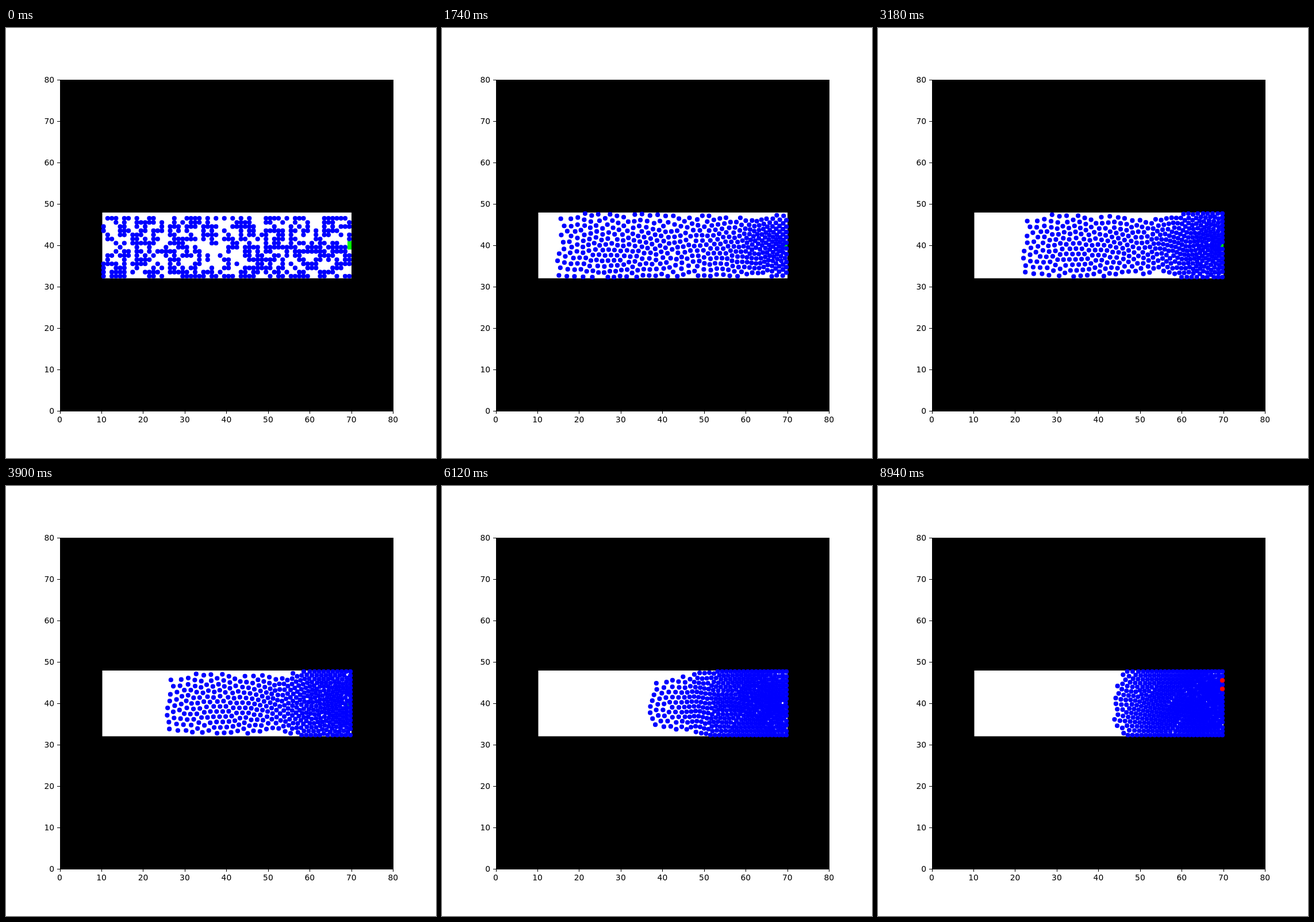
An HTML page with a canvas that plays this animation: 748x748 px, repeating every 9 s.

```html
<!DOCTYPE html>
<html lang="en">
<head>
<meta charset="utf-8">
<title>Crowd leaving a corridor</title>
<style>
  html, body { margin: 0; width: 100%; height: 100%; overflow: hidden; background: #fff; }
  svg, canvas { position: absolute; left: 0; top: 0; }
  text { font: 13.89px "DejaVu Sans", sans-serif; }
</style>
</head>
<body>
<svg id="plot" width="748" height="748">
  <rect x="94" y="90" width="580" height="577"/>
  <rect x="167.5" y="321" width="433.5" height="114.4" fill="#fff"/>
  <rect x="594" y="370.4" width="7" height="15" fill="#0f0"/>
</svg>
<canvas id="crowd" width="748" height="748"></canvas>
<script>
const FRAMES = 150, FRAME_MS = 60, SUBSTEPS = 6, DT = 1 / SUBSTEPS;
const SPEED = 0.33, RELAX = 12;              // walking speed and reaction time, per frame
const EXIT = { x: 70, y: 40 };
const AREA = { left: 10.5, right: 69.75, bottom: 32.3, top: 47.65 };
const DOT_RADIUS = 4.1, RED_FROM = 132, EXIT_INTERVAL = 10;

const px = x => 93.5 + 7.248 * x;
const py = y => 665.8 - 7.199 * y;

function addAxes() {
  let marks = '';
  for (let v = 0; v <= 80; v += 10) {
    const x = Math.round(px(v)) + 0.5, y = Math.round(py(v)) + 0.5;
    marks += `<path d="M${x} 666v5M94 ${y}h-5" stroke="#000" stroke-width="1.1"/>
      <text x="${px(v)}" y="686" text-anchor="middle">${v}</text>
      <text x="84.2" y="${y + 4.5}" text-anchor="end">${v}</text>`;
  }
  document.getElementById('plot').insertAdjacentHTML('beforeend', marks);
}

let seed = 20;
function random() {
  seed = (seed * 1664525 + 1013904223) % 4294967296;
  return seed / 4294967296;
}

// One person per randomly chosen grid cell; the exit cells stay free.
function createPeople() {
  const people = [];
  for (let x = 10.5; x < 70; x++)
    for (let y = 32.5; y < 47; y++) {
      const atExit = x > 69 && Math.abs(y - EXIT.y) < 1;
      if (random() < 0.52 && !atExit) people.push({ id: people.length, x, y, vx: 0, vy: 0, ax: 0, ay: 0 });
    }
  return people;
}

function headForExit(p) {
  const dx = EXIT.x - p.x, dy = EXIT.y - p.y, d = Math.hypot(dx, dy) || 1;
  p.ax = (SPEED * dx / d - p.vx) / RELAX;
  p.ay = (SPEED * dy / d - p.vy) / RELAX;
}

// Exponential repulsion plus damping along the line between two people.
function pushApart(a, b) {
  const dx = a.x - b.x, dy = a.y - b.y, d2 = dx * dx + dy * dy;
  if (d2 > 4) return;
  const d = Math.max(Math.sqrt(d2), 0.4), nx = dx / d, ny = dy / d;
  let force = 0.012 * Math.exp((1.36 - d) / 0.13);
  if (d < 1.5) force -= 0.15 * ((a.vx - b.vx) * nx + (a.vy - b.vy) * ny);
  a.ax += force * nx; a.ay += force * ny;
  b.ax -= force * nx; b.ay -= force * ny;
}

function move(p) {
  p.vx += p.ax * DT; p.vy += p.ay * DT;
  p.x += p.vx * DT; p.y += p.vy * DT;
  const x = Math.min(AREA.right, Math.max(AREA.left, p.x));
  const y = Math.min(AREA.top, Math.max(AREA.bottom, p.y));
  if (x !== p.x) { p.x = x; p.vx = 0; }
  if (y !== p.y) { p.y = y; p.vy = 0; }
}

function step(people) {
  people.forEach(headForExit);
  for (let i = 1; i < people.length; i++)
    for (let j = 0; j < i; j++) pushApart(people[i], people[j]);
  people.forEach(move);
}

function simulate() {
  const people = createPeople(), history = [];
  for (let frame = 1; frame <= FRAMES; frame++) {
    history.push(people.map(({ id, x, y }) => ({ id, x, y })));
    for (let s = 0; s < SUBSTEPS; s++) step(people);
    if (frame % EXIT_INTERVAL === 0) {
      const leaving = people.findIndex(p => p.x > 69.2 && Math.abs(p.y - EXIT.y) < 0.8);
      if (leaving >= 0) people.splice(leaving, 1);
    }
  }
  return history;
}

function nearestId(people, x, y) {
  const distance = p => Math.hypot(p.x - x, p.y - y);
  return people.reduce((best, p) => distance(p) < distance(best) ? p : best).id;
}

addAxes();
const history = simulate();
const last = history[FRAMES - 1];
const crushed = [nearestId(last, 69.7, 45.4), nearestId(last, 69.7, 43.4)];
const ctx = document.getElementById('crowd').getContext('2d');

function drawDots(people, color) {
  ctx.fillStyle = color;
  for (const p of people) {
    ctx.beginPath();
    ctx.arc(px(p.x), py(p.y), DOT_RADIUS, 0, 2 * Math.PI);
    ctx.fill();
  }
}

function draw() {
  const frame = Math.floor(performance.now() / FRAME_MS) % FRAMES;
  const people = history[frame];
  ctx.clearRect(0, 0, 748, 748);
  drawDots(people, '#00f');
  if (frame >= RED_FROM) drawDots(people.filter(p => crushed.includes(p.id)), '#f00');
  requestAnimationFrame(draw);
}
draw();
</script>
</body>
</html>
```
